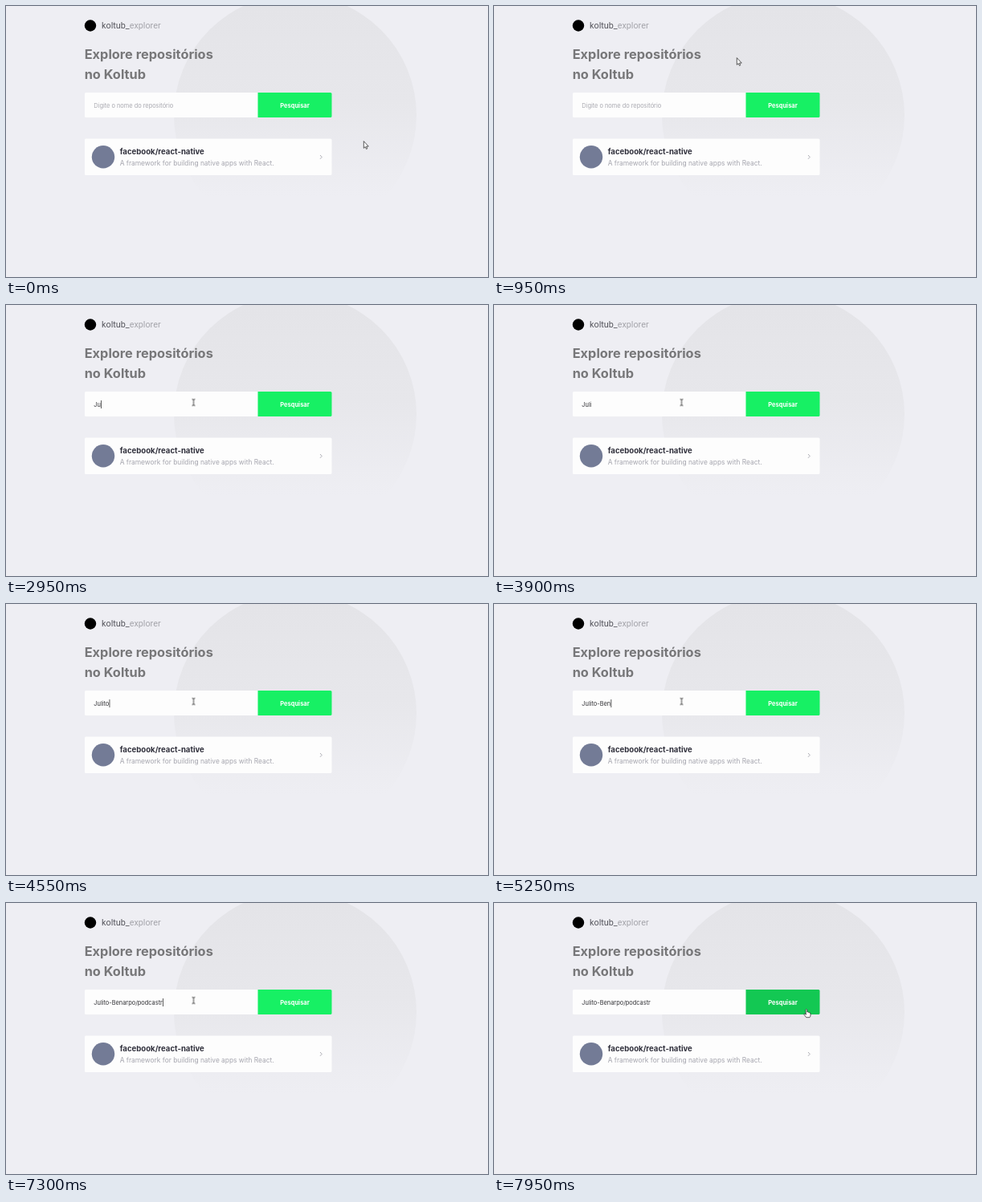
These frames come from a looping animation (600x338 px, 8 s). An HTML page:

```html
<!DOCTYPE html>
<html lang="pt-BR">
<head>
<meta charset="utf-8">
<title>Explore repositórios</title>
<style>
html, body { margin: 0; width: 100%; height: 100%; overflow: hidden; background: #eeeef3; }
svg { display: block; width: 100vw; height: 100vh; font-family: Inter, "Open Sans", sans-serif; }
.brand { font: 400 10.8px Roboto, sans-serif; fill: #55555c; }
.brand .soft { fill: #a4a4aa; }
.title { font-size: 16.35px; font-weight: 700; fill: #777779; }
.field { font-size: 7.4px; fill: #343438; }
.hint { fill: #a9a9b0; }
.action { font-size: 7.5px; font-weight: 700; fill: #fff; text-anchor: middle; }
.repo { font-size: 9.6px; font-weight: 700; fill: #2f2f3b; }
.about { font-size: 8.4px; fill: #a5a5ae; }

#pointer { animation: travel 8s ease-in-out infinite; }
#arrow { animation: arrow 8s step-end infinite; }
#beam { animation: beam 8s step-end infinite; }
#hand { animation: hand 8s step-end infinite; }
#button { animation: hover 8s linear infinite; }

@keyframes travel {
  0%, 2% { transform: translate(445px, 169px); }
  11.5%, 12% { transform: translate(302px, 65px); }
  18.75%, 93.75% { transform: translate(233.5px, 121.5px); }
  98.75%, 100% { transform: translate(389px, 132px); }
}
@keyframes arrow { 0% { opacity: 1; } 16.5%, 100% { opacity: 0; } }
@keyframes beam { 0% { opacity: 0; } 16.5% { opacity: 1; } 96.25%, 100% { opacity: 0; } }
@keyframes hand { 0% { opacity: 0; } 96.25%, 100% { opacity: 1; } }
@keyframes hover { 0%, 96.25% { fill: #17f064; } 98.75%, 100% { fill: #13c853; } }
</style>
</head>
<body>
<svg viewBox="0 0 600 338">
  <defs>
    <linearGradient id="fade" gradientUnits="userSpaceOnUse" x1="0" y1="0" x2="0" y2="237">
      <stop offset="0" stop-color="#e4e4e8"/>
      <stop offset=".5" stop-color="#e7e7eb"/>
      <stop offset="1" stop-color="#eeeef3"/>
    </linearGradient>
  </defs>

  <circle cx="360" cy="136.5" r="151" fill="url(#fade)"/>

  <circle cx="105" cy="24.5" r="7.2"/>
  <text class="brand" x="119" y="28">koltub_<tspan class="soft">explorer</tspan></text>

  <text class="title" x="97.7" y="66">Explore repositórios</text>
  <text class="title" x="97.7" y="90.5">no Koltub</text>

  <rect x="98" y="108" width="230" height="31" rx="1.6" fill="#fdfdfd"/>
  <path id="button" d="M313.5 108h90.4a1.6 1.6 0 0 1 1.6 1.6v27.8a1.6 1.6 0 0 1-1.6 1.6h-90.4z"/>
  <text class="action" x="359.5" y="126.5">Pesquisar</text>
  <text class="field" id="field" x="109.3" y="126.5"></text>
  <rect id="caret" y="119" width=".8" height="10" fill="#333"/>

  <rect x="98" y="165.5" width="307.5" height="45.5" rx="1.6" fill="#fdfdfd"/>
  <circle cx="121" cy="188.3" r="14.2" fill="#737b96"/>
  <text class="repo" x="141.7" y="185">facebook/react-native</text>
  <text class="about" x="141.7" y="199">A framework for building native apps with React.</text>
  <path d="M391 186l2.2 2.4-2.2 2.4" fill="none" stroke="#a4a4ac" stroke-width=".9"/>

  <g id="pointer" stroke-linejoin="round" stroke-linecap="round">
    <path id="arrow" d="M.3 0v8.3l1.9-1.7 1.3 2.8 1.3-.6-1.3-2.7h2.4z" fill="#fff" stroke="#333" stroke-width=".8"/>
    <path id="beam" d="M-1.6-4Q0-4 0-3Q0-4 1.6-4M0-3V3M-1.6 4Q0 4 0 3Q0 4 1.6 4" fill="none" stroke="#333" stroke-width=".9"/>
    <path id="hand" d="M-.9 1Q0-.3.8 1V4Q2 3.2 2.6 4.4Q3.9 4 4 5.2Q5 5 5 6.2V8Q5 9.2 4 10.7H-.3L-3 7.2Q-3.2 5.8-1.9 6.2L-.9 7z" fill="#fff" stroke="#333" stroke-width=".8"/>
  </g>
</svg>
<script>
const HINT = 'Digite o nome do repositório';
const ENTRY = 'Julito-Benarpo/podcastr';
const FOCUS = 1700, BLINK = 500;
const START = 109.3;

// Key times: a short burst, a pause, a second burst, then a steady run.
const keys = [2750, 2900, 3080, 3300, 4300, 4450, 4650, 4850, 5000, 5200];
while (keys.length < ENTRY.length) keys.push(keys[keys.length - 1] + 143);

const field = document.getElementById('field');
const caret = document.getElementById('caret');
const clock = document.getElementById('pointer').getAnimations()[0];

function draw() {
  const time = (clock.currentTime || 0) % 8000;
  const count = keys.filter(key => key <= time).length;
  const lastInput = count ? keys[count - 1] : FOCUS;
  const lit = time >= FOCUS && (time - lastInput) % (2 * BLINK) < BLINK;

  field.textContent = count ? ENTRY.slice(0, count) : HINT;
  field.classList.toggle('hint', !count);
  caret.setAttribute('x', START + (count ? field.getComputedTextLength() + .3 : 0));
  caret.setAttribute('opacity', lit ? 1 : 0);
  requestAnimationFrame(draw);
}
draw();
</script>
</body>
</html>
```
